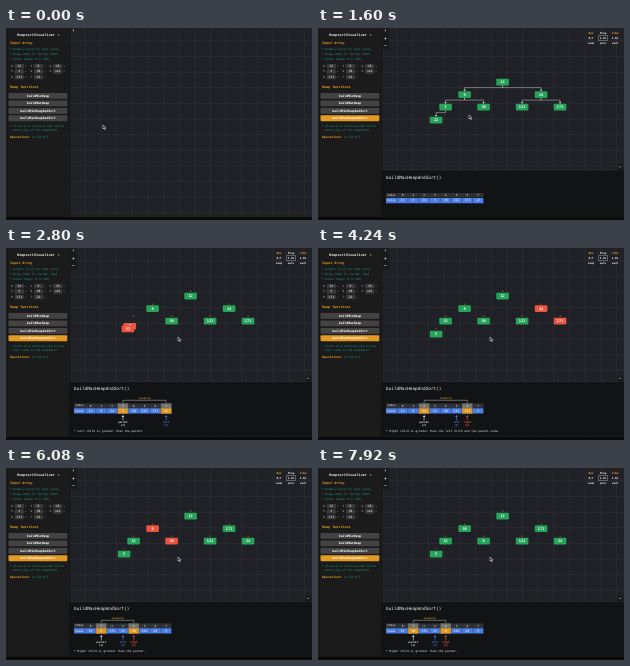
Recreate the animation shown at these times as an HTML page with a canvas. Size 306 by 192 pixels, loop 8000 ms.

```html
<!DOCTYPE html>
<html lang="en">
<head>
<meta charset="utf-8">
<title>Heap sort visualizer</title>
<style>
html, body { margin: 0; width: 100%; height: 100%; overflow: hidden; background: #1b1b1b; }
canvas { display: block; width: 306px; height: 192px; }
</style>
</head>
<body>
<canvas></canvas>
<script>
const canvas = document.querySelector('canvas');
const c = canvas.getContext('2d');
const scale = window.devicePixelRatio || 1;
canvas.width = 306 * scale;
canvas.height = 192 * scale;

const LOOP = 8000, OPEN = 1200, SETTLE = 1800, SWAP = 600;
const ORANGE = '#e39a23', TEAL = '#1a9c86', GREEN = '#27a35a', RED = '#ec5340',
  BLUE = '#4b7fe6', WHITE = '#e6e6e6';
const start = [12, 9, 24, 5, 30, 122, 171, 22];
// Tree slots, relative to the root
const slots = [[0, 0], [-38, 12.5], [38.5, 12.5], [-57, 25], [-19, 25], [19.5, 25], [57.5, 25], [-66.5, 38]];
const steps = [
  { from: 2100, swap: 2560, a: 3, b: 7, kids: [7], log: '* Left child is greater than the parent.' },
  { from: 4000, swap: 5150, a: 2, b: 6, kids: [5, 6], log: '* Right child is greater than the left child and the parent node.' },
  { from: 5800, swap: 6530, a: 1, b: 4, kids: [3, 4], log: '* Right child is greater than the parent.' }
];
const pointerPath = [[0, 98, 99], [80, 98, 99], [160, 52, 95], [600, 36, 90], [1200, 36, 90],
  [1600, 152, 89], [2000, 173, 91], [LOOP, 173, 91]];

function rect(x, y, w, h, fill, r = 0) {
  c.fillStyle = fill;
  c.beginPath();
  c.roundRect(x, y, w, h, r);
  c.fill();
}

function outline(x, y, w, h, color, width = 0.6) {
  c.strokeStyle = color;
  c.lineWidth = width;
  c.strokeRect(x, y, w, h);
}

function line(points, color, width = 0.6) {
  c.strokeStyle = color;
  c.lineWidth = width;
  c.beginPath();
  points.forEach(p => c.lineTo(...p));
  c.stroke();
}

function arrow(x, y, dir, color) {
  c.fillStyle = color;
  c.beginPath();
  c.moveTo(x, y);
  c.lineTo(x - 1.2, y - 2 * dir);
  c.lineTo(x + 1.2, y - 2 * dir);
  c.fill();
}

function text(str, x, y, size, color, align = 'left', weight = '') {
  c.font = `${weight} ${size}px "DejaVu Sans Mono", monospace`;
  c.textAlign = align;
  c.textBaseline = 'middle';
  c.fillStyle = color;
  c.fillText(str, x, y);
}

function pointerAt(t) {
  const i = pointerPath.findIndex(p => p[0] > t);
  const [t0, x0, y0] = pointerPath[i - 1], [t1, x1, y1] = pointerPath[i];
  const k = (t - t0) / (t1 - t0);
  return [x0 + (x1 - x0) * k, y0 + (y1 - y0) * k];
}

function drawSidebar(t) {
  rect(0, 0, 63.5, 192, '#1b1b1b');
  text('HeapsortVisualizer', 30, 6.7, 3.5, WHITE, 'center', 'bold');
  text('×', 52.5, 6.7, 3.5, WHITE, 'center');
  text('Input Array', 4, 15.4, 3.4, ORANGE, 'left', 'bold');
  ['* Double click for edit value', '* Drag items to reorder them', '* Value range: 0 to 999'].forEach((s, i) =>
    text(s, 4, 21.6 + i * 4.9, 2.8, TEAL));
  start.forEach((v, i) => {
    const x = 5 + (i % 3) * 19.2, y = 38 + Math.floor(i / 3) * 5.5;
    text(i, x, y, 2.9, '#bbb');
    rect(x + 3.7, y - 2, 9.3, 4.2, '#3a3a3a', 0.6);
    text(v, x + 8.3, y, 3, '#fff', 'center');
    text('×', x + 14, y, 2.5, '#999');
  });
  text('Heap functions', 4, 59, 3.4, ORANGE, 'left', 'bold');
  ['buildMinHeap', 'buildMaxHeap', 'buildMinHeapAndSort', 'buildMaxHeapAndSort'].forEach((s, i) => {
    const y = 65 + i * 7.45, active = i === 3 && t >= 900;
    rect(2.5, y, 58.8, 5.8, active ? ORANGE : '#434343', 0.8);
    text(s, 32, y + 3, 3.1, '#fff', 'center', 'bold');
  });
  text('* Click on a function and follow', 4, 98, 2.8, TEAL);
  text('  each step of the animation', 4, 102.4, 2.8, TEAL);
  text('Operations:', 4, 109.5, 3.1, ORANGE, 'left', 'bold');
  text('n-1=8-1=7', 26, 109.5, 3, TEAL);
}

function drawGrid() {
  rect(63.5, 0, 242.5, 192, '#202126');
  for (let x = 79.3; x < 306; x += 15.65) line([[x, 0], [x, 189]], '#303238', 0.6);
  for (let y = 13; y < 189; y += 15.6) line([[63.5, y], [306, y]], '#303238', 0.6);
  line([[63.7, 0], [63.7, 189]], '#111', 0.6);
}

function drawToolbar() {
  rect(64, 0, 6.5, 21.5, '#18191b');
  ['+', '−'].forEach((s, i) => text(s, 67.3, 10.7 + i * 7.4, 4.5, WHITE, 'center', 'bold'));
  ['Ops', 'Step', 'Time'].forEach((s, i) => {
    const x = 273 + i * 12, mid = i === 1;
    text(s, x, 5.2, 2.8, mid ? WHITE : ORANGE, 'center', 'bold');
    text(['0/7', '1.0x', '1.0s'][i], x, 10.2, 2.8, WHITE, 'center', 'bold');
    text(['swap', 'auto', 'each'][i], x, 14.9, 2.7, WHITE, 'center', 'bold');
    if (mid) outline(x - 4.8, 7.8, 9.6, 4.8, '#bbb', 0.4);
  });
}

function drawNode(x, y, value, color) {
  rect(x - 6.3, y - 3.3, 12.6, 6.7, color, 0.8);
  text(value, x, y + 0.2, 3.6, '#fff', 'center', 'bold');
}

function drawTree(t, values, step, k) {
  const rootY = t < SETTLE ? 54 : 48;
  const at = i => [184.6 + slots[i][0], rootY + slots[i][1]];
  if (t < SETTLE) {
    for (let i = 1; i < 8; i++) {
      const [px, py] = at((i - 1) >> 1), [x, y] = at(i), bend = py + 5.6;
      line([[px, py + 3], [px, bend], [x, bend], [x, y - 4]], '#c9c9c9', 0.5);
      arrow(x, y - 3, 1, '#c9c9c9');
    }
  }
  const moving = step && k < 1 ? [step.a, step.b] : [];
  for (let i = 0; i < 8; i++) {
    const [x, y] = at(i);
    if (t >= SETTLE) text(i, x, y - 4.4, 2.4, ORANGE, 'center');
    if (!moving.includes(i)) drawNode(x, y, values[i], GREEN);
  }
  // Empty slots flash as the nodes leave
  if (k > 0) {
    c.globalAlpha = Math.max(0, 1 - k / 0.4);
    moving.forEach(i => {
      const [x, y] = at(i);
      outline(x - 6, y - 3, 12, 6.2, '#fff', 0.5);
    });
    c.globalAlpha = 1;
  }
  moving.forEach((i, n) => {
    const [x, y] = at(i), [tx, ty] = at(moving[1 - n]);
    drawNode(x + (tx - x) * k, y + (ty - y) * k, values[i], RED);
  });
}

function drawPanel(t, values, step) {
  const early = t < SETTLE, top = early ? 142 : 133.5, row = early ? 165 : 155.4;
  const col = i => 84.5 + i * 10.8;
  rect(63.5, top, 242.5, 55, '#121314');
  line([[63.5, top], [306, top]], '#3a3b3e', 0.5);
  rect(299, top - 6, 6, 6, '#18191b');
  line([[300.8, top - 3.8], [302, top - 2.6], [303.2, top - 3.8]], WHITE, 0.5);
  text('buildMaxHeapAndSort()', 68, top + 7.4, 4.4, '#f2f2f2');
  rect(68, row, 97.4, 4.6, '#303236');
  rect(68, row + 4.9, 97.4, 5.3, BLUE);
  text('Index', 73.4, row + 2.4, 2.7, '#eee', 'center');
  text('Value', 73.4, row + 7.6, 2.7, '#fff', 'center');
  values.forEach((v, i) => {
    const x = col(i), hot = step && (i === step.a || i === step.b);
    if (hot) {
      rect(x - 5.4, row, 10.8, 4.6, '#77746c');
      rect(x - 5.4, row + 4.9, 10.8, 5.3, ORANGE);
    }
    line([[x - 5.4, row], [x - 5.4, row + 10.2]], '#1c2638', 0.35);
    text(i, x, row + 2.4, 2.9, '#eee', 'center');
    text(v, x, row + 7.6, 3.2, '#fff', 'center');
  });
  if (!step) return;

  const xa = col(step.a), xb = col(step.b);
  line([[xa, 155], [xa, 152.3], [xb, 152.3], [xb, 155]], '#c8c8c8', 0.45);
  text('swaping', (xa + xb) / 2, 149.8, 2.8, ORANGE, 'center');
  const mark = (i, color, label) => {
    const x = col(i);
    line([[x, 168], [x, 172.5]], color);
    arrow(x, 167, -1, color);
    text(label, x, 174.7, 2.6, color, 'center', 'bold');
    text(`[${i}]`, x, 177.5, 2.5, color, 'center', 'bold');
  };
  mark(step.a, WHITE, 'parent');
  step.kids.forEach((i, n) => mark(i, n ? RED : BLUE, n ? 'right' : 'left'));
  text(step.log, 68, 183.3, 2.9, '#eee');
}

function drawPointer([x, y]) {
  c.beginPath();
  [[0, 0], [0, 4], [1, 3.1], [1.7, 4.6], [2.4, 4.3], [1.7, 2.8], [3, 2.8]].forEach(([dx, dy]) =>
    c.lineTo(x - 1 + dx, y - 2 + dy));
  c.closePath();
  c.fillStyle = '#111';
  c.fill();
  c.strokeStyle = '#fff';
  c.lineWidth = 0.5;
  c.stroke();
}

function draw(t) {
  c.setTransform(scale, 0, 0, scale, 0, 0);
  const values = [...start];
  let step = null, k = 0;
  for (const s of steps) {
    if (t < s.from) break;
    step = s;
    k = Math.min(1, Math.max(0, (t - s.swap) / SWAP));
    if (k === 1) [values[s.a], values[s.b]] = [values[s.b], values[s.a]];
  }
  drawGrid();
  drawSidebar(t);
  if (t >= OPEN) {
    drawToolbar();
    drawTree(t, values, step, k);
    drawPanel(t, values, step);
  }
  text('‹', 67.4, 3, 5.5, WHITE, 'center', 'bold');
  rect(0, 189, 306, 3, '#0b0b0b');
  drawPointer(pointerAt(t));
}

const begin = performance.now();
function tick() {
  draw((performance.now() - begin) % LOOP);
  requestAnimationFrame(tick);
}
tick();
</script>
</body>
</html>
```
